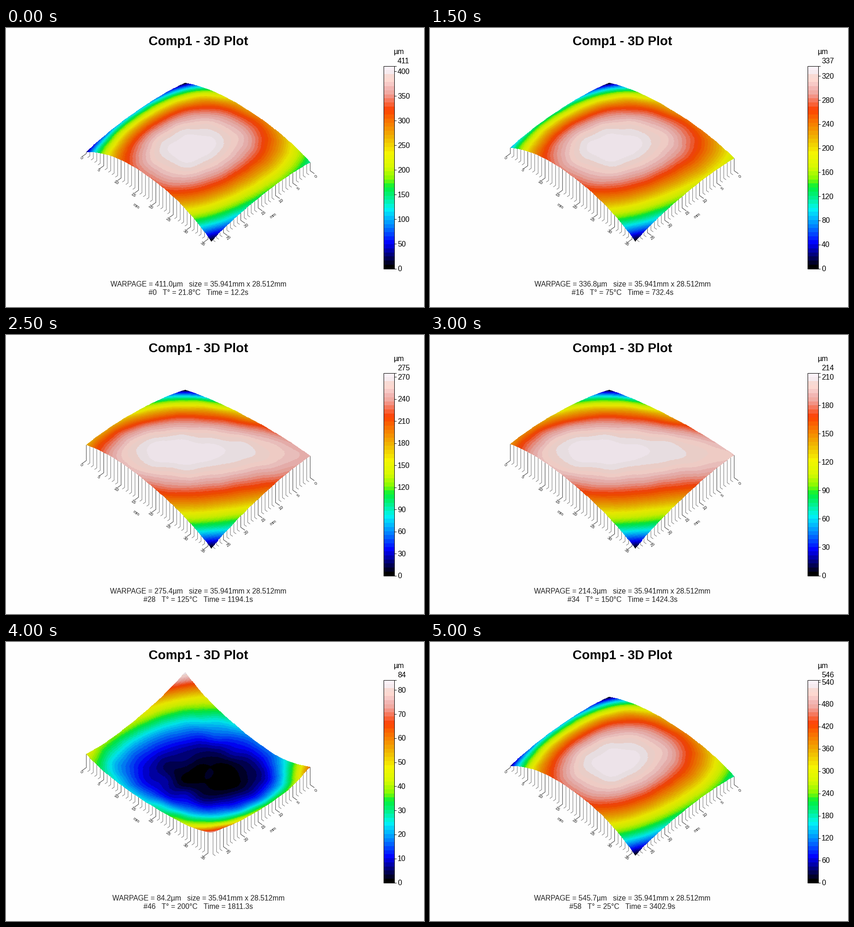
Write a matplotlib script that moves like this. It is 900 by 600 pixels and loops after 5.5 s.

```python
import numpy as np
import matplotlib.pyplot as plt
from matplotlib.animation import FuncAnimation
from matplotlib.collections import LineCollection
from matplotlib.colors import LinearSegmentedColormap, ListedColormap
from matplotlib.patches import Rectangle

W, H, DPI = 900, 600, 100
PX = 72 / DPI
plt.rcParams["font.family"] = "Liberation Sans"

# Oblique floor: back corner, the two floor axes and the height of z = 1
BACK = np.array([386, 118])
U_AXIS, V_AXIS, RISE = np.array([269, 189]), np.array([-213, 152]), 53
U_LEN, V_LEN = 35.941, 28.512

STOPS = [
    (0, "#000000"), (.05, "#000064"), (.12, "#0000ff"), (.19, "#006eff"),
    (.24, "#00b4ff"), (.29, "#00f5f5"), (.36, "#00f078"), (.40, "#00f03c"),
    (.44, "#82fa00"), (.50, "#d7fa00"), (.57, "#f5f500"), (.65, "#f0b400"),
    (.74, "#f86e00"), (.79, "#fd4000"), (.845, "#f5826e"), (.87, "#f0a59b"),
    (.91, "#f3bebe"), (.93, "#fdd8d0"), (.955, "#fdd8d0"), (.97, "#ebdede"),
    (.985, "#fcf2f8"), (1, "#fcf2f8"),
]
BANDS = 50
bar_cmap = LinearSegmentedColormap.from_list("bar", STOPS, N=BANDS)
lit = bar_cmap(np.arange(BANDS))
lit[:, :3] *= .94
surface_cmap = ListedColormap(lit)

# temperature in °C, time in s, warpage in µm, scale step in µm
READINGS = [
    (21.8, 12.2, 411.0, 50), (25, 270.2, 402.6, 50), (50, 501, 344.4, 40),
    (75, 732.4, 336.8, 40), (100, 963.7, 321.9, 40), (125, 1194.1, 275.4, 30),
    (150, 1424.3, 214.3, 30), (180, 1629.4, 28.6, 4), (200, 1811.3, 84.2, 10),
    (220, 1993.1, 173.0, 30), (25, 3402.9, 545.7, 60),
]

u = np.linspace(0, 1, 261)
v = np.linspace(0, 1, 221)
U, V = np.meshgrid(u, v)


def ripple():
    rng = np.random.default_rng(4)
    total = np.zeros_like(U)
    for _ in range(9):
        a, b = rng.uniform(-38, 38, 2)
        total += np.sin(a * U + b * V + rng.uniform(0, 6.28))
    return total / 9


RIPPLE = ripple()


def smoothstep(t):
    t = np.clip(t, 0, 1)
    return t * t * (3 - 2 * t)


def bump(a, b, wu, wv):
    return np.exp(-((U - a) / wu) ** 2 - ((V - b) / wv) ** 2)


def bowed(back, right, left, front, middle, tilt):
    """Sheet through four corner heights, bowed to reach `middle`."""
    sheet = ((1 - V) * ((1 - U) * back + U * right)
             + V * ((1 - U) * left + U * front))
    x, y = 2 * U - 1, 2 * V - 1
    bow_v = .23 * np.sign(middle - .5)
    bow_u = middle - (back + right + left + front) / 4 - bow_v
    return (sheet + (bow_u + tilt * y) * (1 - abs(x) ** 2.3)
            + bow_v * (1 - abs(y) ** 2.3))


def dome(temp):
    k = smoothstep((temp - 40) / 100)
    return bowed(0, .34 + .59 * k, .06 + .62 * k, .01, 1, .15)


def flat():
    """Ridge with rows of dies, lifted at three corners."""
    width = np.where(U < .47, .33, .36)
    z = .77 * np.exp(-(abs(U - .47) / width) ** 3)
    z += .93 * bump(1, 0, .21, .14) + .45 * bump(1, 1, .39, .35)
    z += .10 * bump(0, 0, .22, .22)
    for row in range(4):
        for col in range(2):
            a = .375 + .155 * col + .002 * row ** 4
            z += .13 * bump(a, .17 + .26 * row, .06, .085)
    return z + .03 * RIPPLE


def heights(temp):
    if temp <= 150:
        z = dome(temp)
    else:
        k = (temp - 180) / 40
        z = (1 - k) * 28.6 * flat() + k * 173 * bowed(1, .61, .61, .87, 0, .06)
    z = (z - z.min()) / np.ptp(z) + .01 * RIPPLE
    return np.clip(z, 0, 1)


def project(a, b, z=0):
    return (BACK[0] + a * U_AXIS[0] + b * V_AXIS[0],
            BACK[1] + a * U_AXIS[1] + b * V_AXIS[1] - RISE * z)


def tick_lines(z):
    lines, colors = [], []

    def add(a, b, top, out, major):
        x, y = project(a, b)
        d = out / np.hypot(*out) * (11 if major else 6)
        lines.append([(x, y - RISE * top), (x, y), (x + d[0], y + d[1])])
        colors.append("#222222" if major else "#666666")

    for mm in range(int(U_LEN) + 1):
        a = mm / U_LEN
        add(a, 1, np.interp(a, u, z[-1]), V_AXIS, mm % 5 == 0)
    for mm in range(int(V_LEN) + 1):
        b = mm / V_LEN
        add(1, b, np.interp(b, v, z[:, -1]), U_AXIS, mm % 5 == 0)
    return LineCollection(lines, colors=colors, linewidths=.9 * PX, zorder=1)


fig = plt.figure(figsize=(W / DPI, H / DPI), dpi=DPI, facecolor="#fefefe")
ax = fig.add_axes([0, 0, 1, 1])
ax.set_xlim(0, W)
ax.set_ylim(H, 0)
ax.axis("off")


def label(x, y, s, size=16, **kw):
    kw = {"ha": "left", "va": "baseline", "color": "black", **kw}
    return ax.text(x, y, s, fontsize=size * PX, **kw)


def floor_label(x, y, s, angle, size=9.5):
    label(x, y, s, size, ha="center", va="center", rotation=angle,
          color="#222222")


BAR_X, BAR_W, BAR_TOP, BAR_BOTTOM = 812.5, 23, 81.5, 517.5

label(414.5, 37, "Comp1 - 3D Plot", 27.8, ha="center", weight="bold")
label(835, 56, "µm")
ax.pcolormesh([BAR_X, BAR_X + BAR_W],
              np.linspace(BAR_BOTTOM, BAR_TOP, BANDS + 1),
              np.arange(BANDS)[:, None], cmap=bar_cmap, antialiased=False)
ax.add_patch(Rectangle((BAR_X, BAR_TOP), BAR_W, BAR_BOTTOM - BAR_TOP,
                       fill=False, ec="black", lw=PX, zorder=3))
for i in range(8):
    floor_label(162 + 37.4 * i, 279.5 + 26.4 * i, str(5 * i), -35)
for i in range(6):
    floor_label(667 - 37.5 * i, 319 + 26.4 * i, str(5 * i), 35)
floor_label(280, 383.5, "mm", -35, 9)
floor_label(575, 403.5, "mm", 35, 9)

drawn = []


def bar_tick(y):
    x = BAR_X + BAR_W
    drawn.extend(ax.plot([x, x + 4], [y, y], color="black", lw=PX))


def update(frame):
    while drawn:
        drawn.pop().remove()
    temp, time, warp, step = READINGS[frame]
    z = heights(temp)
    x, y = project(U, V, z)
    cells = (z[:-1, :-1] + z[1:, :-1] + z[:-1, 1:] + z[1:, 1:]) / 4
    drawn.append(ax.add_collection(tick_lines(z)))
    drawn.append(ax.pcolormesh(x, y, cells, cmap=surface_cmap, vmin=0, vmax=1,
                               antialiased=False, zorder=2))

    for value in range(0, int(warp) + 1, step):
        ty = BAR_BOTTOM - (BAR_BOTTOM - BAR_TOP) * value / warp
        bar_tick(ty)
        drawn.append(label(843, ty + 5.5, str(value)))
    bar_tick(BAR_TOP)
    drawn.append(label(843, 76.5, f"{warp:.0f}"))

    number = max(0, 6 * frame - 2)
    size = f"size = {U_LEN}mm x {V_LEN}mm"
    for ty, s in ((556, f"WARPAGE = {warp:.1f}µm   {size}"),
                  (574, f"#{number}   T° = {temp:g}°C   Time = {time:g}s")):
        drawn.append(label(414.3, ty, s, 15.66, ha="center", color="#222222"))
    return drawn


anim = FuncAnimation(fig, update, frames=len(READINGS), interval=500,
                     repeat=True, repeat_delay=0, blit=False)
plt.show()
```
